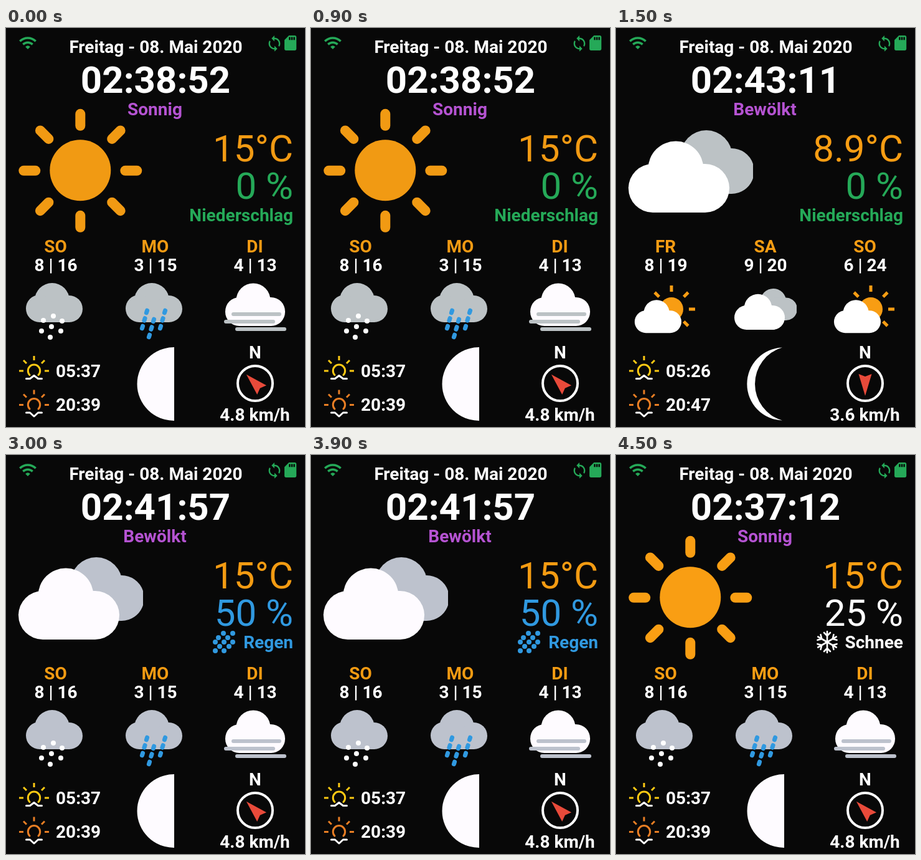
Write an HTML page that moves like this. It is 480 px wide and 640 px high and loops after 6 s.

```html
<!DOCTYPE html>
<html lang="de">
<head>
<meta charset="utf-8">
<title>Wetterstation</title>
<style>
html, body { margin: 0; width: 100%; height: 100%; overflow: hidden; background: #080808; }
svg { display: block; width: 480px; height: 640px; }
text { font-family: Roboto, "Open Sans", sans-serif; font-size: 28px; font-weight: 700; }
text.clock { font-size: 60px; }
text.big { font-size: 60px; font-weight: 400; }
</style>
</head>
<body>
<svg id="stage" viewBox="0 0 480 640" xmlns="http://www.w3.org/2000/svg"></svg>
<script>
const GREEN = '#25a958', PURPLE = '#b553d2', BLUE = '#3099e0', RED = '#e84a3a';
const STEP = 1500;

const text = (s, x, y, fill = '#fff', anchor = 'middle', cls = '') =>
  `<text x="${x}" y="${y}" fill="${fill}" text-anchor="${anchor}" class="${cls}">${s}</text>`;
const circle = (x, y, r, fill) => `<circle cx="${x}" cy="${y}" r="${r}" fill="${fill}"/>`;
const path = (d, fill) => `<path d="${d}" fill="${fill}"/>`;
const line = (d, color, w, cap = 'round') =>
  `<path d="${d}" fill="none" stroke="${color}" stroke-width="${w}" stroke-linecap="${cap}" stroke-linejoin="round"/>`;
const place = (x, y, s, body) => `<g transform="translate(${x} ${y}) scale(${s})">${body}</g>`;
const dots = (list, r, fill) => list.map(([x, y]) => circle(x, y, r, fill)).join('');

function rays(cx, cy, from, to, angles, color, w, cap) {
  return angles.map(a => {
    const c = Math.cos(a * Math.PI / 180), s = Math.sin(a * Math.PI / 180);
    return line(`M${cx + c * from} ${cy + s * from}L${cx + c * to} ${cy + s * to}`, color, w, cap);
  }).join('');
}

// Weather symbols
const sun = c => circle(119.3, 228.3, 49, c.orange) +
  rays(119.3, 228.8, 72, 91, [0, 45, 90, 135, 180, 225, 270, 315], c.orange, 16);

const puff = c => circle(96, 226, 44.5, c.white) +
  `<rect x="20" y="218" width="162" height="78" rx="39" fill="${c.white}"/>`;

const clouds = c => circle(145, 205.5, 41.5, c.gray) +
  path('M145 193H184A36.5 36.5 0 0 1 220 218V241A36.5 36.5 0 0 1 184 266H145Z', c.gray) + puff(c);

const partly = c => circle(89, 451, 19, c.orange) +
  rays(89, 451, 28, 38, [-135, -90, -45, 0, 45], c.orange, 5, 'butt') +
  place(20.7, 352.2, 0.463, puff(c));

const grayCloud = c => circle(74, 437, 28, c.gray) + circle(54, 450, 22, c.gray) +
  circle(101.5, 450.5, 21.5, c.gray) + `<rect x="54" y="440" width="47.5" height="32" fill="${c.gray}"/>`;

const snow = c => grayCloud(c) +
  dots([[76, 462], [60, 469], [90, 470], [73, 479], [57, 486], [88, 486], [71, 496]], 4, '#fff');

const rain = c => grayCloud(c) + [[66, 455], [95, 455], [77, 469]].map(([x, y]) =>
  [0, 1, 2].map(i => line(`M${x + 0.6 - i * 3.5} ${y - 1.8 + i * 12.5}l-1.2 3.6`, BLUE, 7)).join('')).join('');

const fog = c => circle(77, 437, 27.5, c.white) +
  `<rect x="32" y="432" width="96" height="46" rx="22.5" fill="${c.white}"/>` +
  line('M45 459H119M33 471H109M51 483H127', c.gray, 6);

// Fixed symbols
const wifi = path('M1 9l2 2c4.97-4.97 13.03-4.97 18 0l2-2C16.93 2.93 7.08 2.93 1 9zm8 8l3 3 3-3c-1.65-1.66-4.34-1.66-6 0zm-4-4l2 2c2.76-2.76 7.24-2.76 10 0l2-2C15.14 9.14 8.87 9.14 5 13z', GREEN);
const sync = path('M12 4V1L8 5l4 4V6c3.31 0 6 2.69 6 6 0 1.01-.25 1.97-.7 2.8l1.46 1.46C19.54 15.03 20 13.57 20 12c0-4.42-3.58-8-8-8zm0 14c-3.31 0-6-2.69-6-6 0-1.01.25-1.97.7-2.8L5.24 7.74C4.46 8.97 4 10.43 4 12c0 4.42 3.58 8 8 8v3l4-4-4-4v3z', GREEN);
const card = path('M18 2h-8L4.02 8 4 20c0 1.1.9 2 2 2h12c1.1 0 2-.9 2-2V4c0-1.1-.9-2-2-2zm-6 6h-2V4h2v4zm3 0h-2V4h2v4zm3 0h-2V4h2v4z', GREEN);

const horizon = (y, color, dip) =>
  rays(45, y, 17, 24, [180, 225, 270, 315, 0], color, 3, 'butt') +
  line(`M38 ${y + 6.5}A9.7 9.7 0 1 1 52 ${y + 6.5}`, color, 3) +
  line(`M32.5 ${y + 12.5}H38.5L45 ${y + 12.5 + dip}L51.5 ${y + 12.5}H57.5`, '#fff', 3);

const drizzle = dots([[349, 286], [364, 286], [341, 293], [356, 293], [336, 300], [350, 300],
  [364, 300], [343, 307], [358, 307], [336, 314], [350, 314]], 4, BLUE);

const flake = [0, 60, 120, 180, 240, 300].map(a =>
  `<g transform="translate(339 300) rotate(${a})">${line('M0 0V-17M-5 -15L0 -10L5 -15', '#fff', 2.6)}</g>`).join('');

const halfMoon = 'M270 512A59.5 59 0 0 0 270 630Z';
const crescent = 'M267 512.5A58.53 58.53 0 0 0 267 629.5A60.9 60.9 0 0 1 267 512.5Z';

// Data
const weekend = {
  days: [['SO', '8 | 16', snow], ['MO', '3 | 15', rain], ['DI', '4 | 13', fog]],
  rise: '05:37', set: '20:39', moon: halfMoon, wind: 135, speed: '4.8 km/h'
};
const friday = {
  days: [['FR', '8 | 19', partly], ['SA', '9 | 20', c => place(20, 336, 0.5, clouds(c))], ['SO', '6 | 24', partly]],
  rise: '05:26', set: '20:47', moon: crescent, wind: 0, speed: '3.6 km/h'
};
const tones = (orange, white, gray) => ({ orange, white, gray });

const scenes = [
  { ...weekend, time: '02:38:52', sky: 'Sonnig', icon: sun, temp: '15°C', chance: '0 %', kind: 'Niederschlag',
    tint: GREEN, mark: '', c: tones('#f19a13', '#fefbff', '#bcc2c5') },
  { ...friday, time: '02:43:11', sky: 'Bewölkt', icon: clouds, temp: '8.9°C', chance: '0 %', kind: 'Niederschlag',
    tint: GREEN, mark: '', c: tones('#f89d13', '#ffffff', '#bcc2c5') },
  { ...weekend, time: '02:41:57', sky: 'Bewölkt', icon: clouds, temp: '15°C', chance: '50 %', kind: 'Regen',
    tint: BLUE, mark: drizzle, c: tones('#f39b12', '#fefbff', '#bdc2cd') },
  { ...weekend, time: '02:37:12', sky: 'Sonnig', icon: sun, temp: '15°C', chance: '25 %', kind: 'Schnee',
    tint: '#fff', mark: flake, c: tones('#f99e13', '#fefbff', '#bdc2cd') }
];

const draw = s => [
  text(s.time, 240, 104, '#fff', 'middle', 'clock'),
  text(s.sky, 239, 140, PURPLE),
  s.icon(s.c),
  text(s.temp, 461, 214, s.c.orange, 'end', 'big'),
  text(s.chance, 461, 274, s.tint, 'end', 'big'),
  text(s.kind, 461, 310, s.tint, 'end'),
  s.mark,
  ...s.days.map(([day, range, icon], i) => {
    const x = i * 160;
    return text(day, 79.5 + x, 360, s.c.orange) + text(range, 80 + x, 390) + place(x, 0, 1, icon(s.c));
  }),
  text(s.rise, 80, 560, '#fff', 'start'),
  text(s.set, 80, 614, '#fff', 'start'),
  path(s.moon, s.c.white),
  `<path d="M-10.5 -15L0 -11L10.5 -15L0 20Z" fill="${RED}" transform="translate(400 570) rotate(${s.wind})"/>`,
  text(s.speed, 399.5, 630)
].join('');

const stage = document.getElementById('stage');
stage.innerHTML = '<rect width="480" height="640" fill="#080808"/>' +
  place(19.75, 8.6, 1.27, wifi) + place(416.9, 10.9, 1.17, sync) + place(442.2, 9.6, 1.2, card) +
  text('Freitag - 08. Mai 2020', 240.5, 40) +
  horizon(550, '#fdc913', -5) + horizon(604.5, '#e87e24', 6) +
  text('N', 400, 530) +
  '<circle cx="400" cy="570" r="28" fill="none" stroke="#fff" stroke-width="4"/>' +
  scenes.map(s => `<g class="scene" display="none">${draw(s)}</g>`).join('');

const views = [...stage.querySelectorAll('.scene')];
const start = performance.now();
let shown = -1;

function tick() {
  const now = Math.floor((performance.now() - start) / STEP) % views.length;
  if (now !== shown) {
    views.forEach((v, i) => v.setAttribute('display', i === now ? 'inline' : 'none'));
    shown = now;
  }
  requestAnimationFrame(tick);
}
tick();
</script>
</body>
</html>
```
